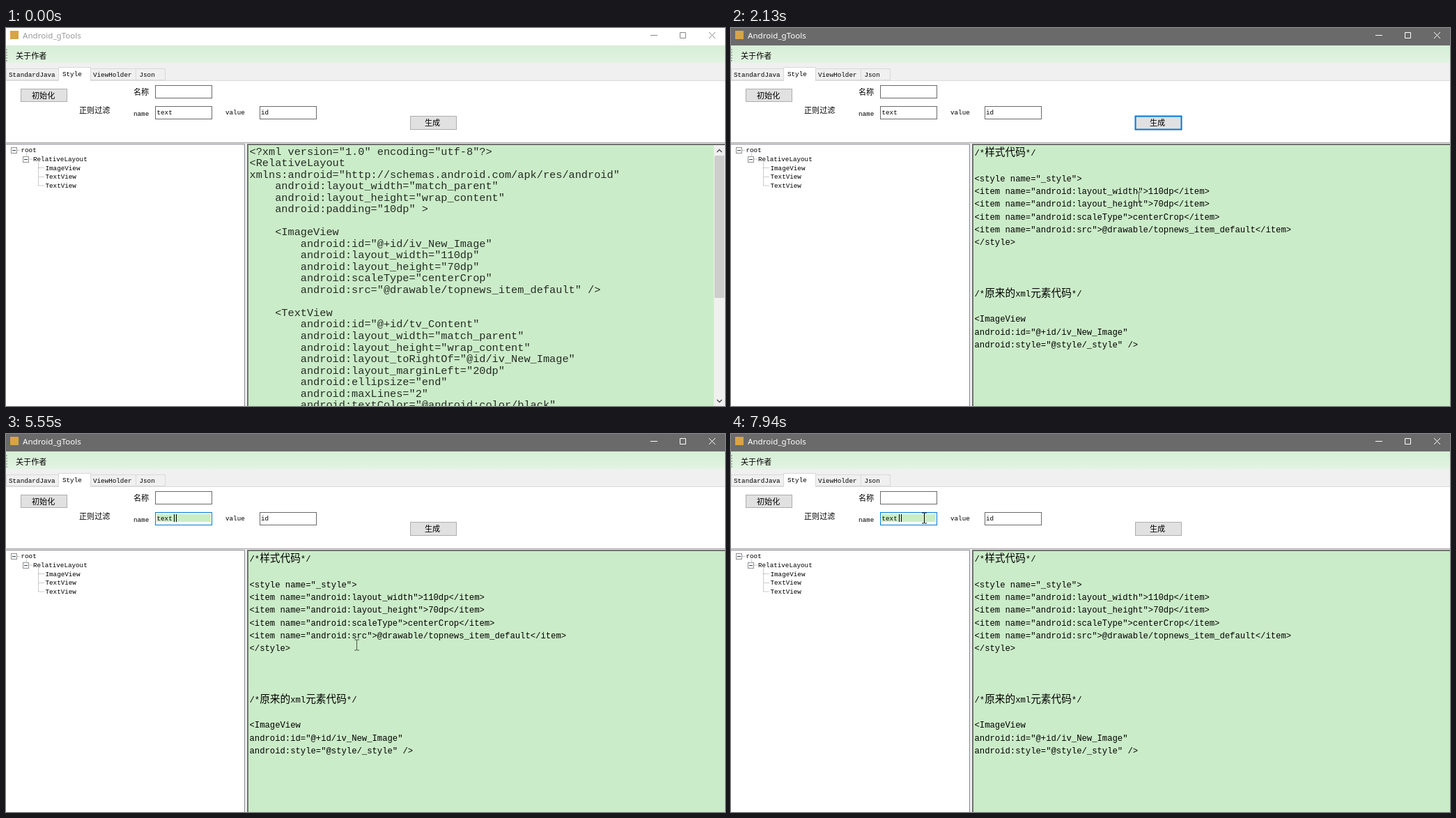
Animation of 1032 by 542 pixels, one loop 8000 ms. Source, as an HTML page:

```html
<!DOCTYPE html>
<html lang="zh">
<head>
<meta charset="utf-8">
<style>
html, body { margin: 0; width: 100%; height: 100%; overflow: hidden; background: #fff; }
svg { display: block; width: 1032px; height: 542px; }
text { white-space: pre; fill: #000; }
.ui { font: 9.25px "Liberation Mono", monospace; }
.ui tspan { font: 11.1px "Noto Sans CJK SC", "Noto Sans CJK", sans-serif; }
.xml { font: 15.27px "Liberation Mono", monospace; fill: #242c24; }
.out { font: 12.22px "Liberation Mono", monospace; }
.out tspan { font: 14.67px "Noto Sans CJK SC", "Noto Sans CJK", sans-serif; }
.title { font: 11.6px "Noto Sans", "Open Sans", sans-serif; }
</style>
</head>
<body>
<svg id="stage" viewBox="0 0 1032 542"></svg>
<script>
const PERIOD = 8000, GREEN = '#cbecc8', BLUE = '#0078d7';

const xmlCode = `<?xml version="1.0" encoding="utf-8"?>
<RelativeLayout
xmlns:android="http://schemas.android.com/apk/res/android"
    android:layout_width="match_parent"
    android:layout_height="wrap_content"
    android:padding="10dp" >

    <ImageView
        android:id="@+id/iv_New_Image"
        android:layout_width="110dp"
        android:layout_height="70dp"
        android:scaleType="centerCrop"
        android:src="@drawable/topnews_item_default" />

    <TextView
        android:id="@+id/tv_Content"
        android:layout_width="match_parent"
        android:layout_height="wrap_content"
        android:layout_toRightOf="@id/iv_New_Image"
        android:layout_marginLeft="20dp"
        android:ellipsize="end"
        android:maxLines="2"
        android:textColor="@android:color/black"`;

const styleCode = `/*样式代码*/

<style name="_style">
<item name="android:layout_width">110dp</item>
<item name="android:layout_height">70dp</item>
<item name="android:scaleType">centerCrop</item>
<item name="android:src">@drawable/topnews_item_default</item>
</style>



/*原来的xml元素代码*/

<ImageView
android:id="@+id/iv_New_Image"
android:style="@style/_style" />`;

const esc = s => s.replace(/&/g, '&amp;').replace(/</g, '&lt;');
const text = (s, x, y, cls = 'ui', id = '') =>
  `<text id="${id}" class="${cls}" x="${x}" y="${y}">` +
  esc(s).replace(/[\u4e00-\u9fff]+/g, '<tspan>$&</tspan>') + '</text>';
const lines = (s, y, pitch, cls) =>
  s.split('\n').map((line, i) => text(line, 349.5, y + i * pitch, cls)).join('');
const rect = (x, y, w, h, fill, stroke = 'none', id = '') =>
  `<rect id="${id}" x="${x}" y="${y}" width="${w}" height="${h}" fill="${fill}" stroke="${stroke}"/>`;
const path = (d, stroke, extra = '') => `<path d="${d}" fill="none" stroke="${stroke}" ${extra}/>`;
const field = (x, y, id) => rect(x + .5, y + .5, 81, 18, '#fff', '#6a6a6a', id);
const tab = (x, w, s, tx) => rect(x + .5, 58.5, w, 16, '#f0f0f0', '#d9d9d9') + text(s, tx, 70);
const toggle = (x, y) => rect(x - 3.5, y - 3.5, 8, 8, '#fff', '#919191') +
  path(`M${x - 2} ${y + .5}h5`, '#345');

const stage = document.getElementById('stage');
stage.innerHTML = `
<defs><linearGradient id="bar" x2="0" y2="1">
  <stop stop-color="#d6eed6"/><stop offset="1" stop-color="#e2f3e2"/>
</linearGradient></defs>
${rect(0, 0, 1032, 542, '#fff')}
${rect(0, 0, 1032, 25, '#fff', 'none', 'titleBar')}
${rect(6, 4, 12, 12, '#d9a441')}
${text('Android_gTools', 24, 15, 'title', 'title')}
<g id="controls" fill="none">
  <path d="M925 10.5h10M967.5 6.5h8v8h-8zM1009 6l9 9m0-9l-9 9"/>
</g>
${rect(0, 25, 1032, 25, 'url(#bar)')}
${path('M1 30v18', '#a9b9a9', 'stroke-width="2" stroke-dasharray="2 2"')}
${text('关于作者', 14, 44)}
${rect(0, 50, 1032, 25, '#f0f0f0')}
${path('M0 75.5H1032', '#dcdcdc')}
${tab(0, 75, 'StandardJava', 4)}${tab(121, 65, 'ViewHolder', 125)}${tab(186, 42, 'Json', 191.5)}
${rect(75.5, 56.5, 46, 19, '#fff', '#d9d9d9')}${rect(76, 75, 45, 2, '#fff')}
${text('Style', 81, 68.5)}
${rect(21.5, 87.5, 66, 18, '#e1e1e1', '#adadad')}${text('初始化', 37, 101)}
${text('正则过滤', 105, 122)}${text('名称', 183, 96)}
${text('name', 183, 125.5)}${text('value', 315, 124)}
${field(214, 82)}${field(214, 112, 'nameField')}${field(364, 112)}
${rect(216, 115, 78, 11, GREEN, 'none', 'tint')}
${text('text', 216.5, 124)}${text('id', 366, 124)}
${path('M241.5 115v11', '#000', 'id="typed"')}
${path('M0 115v11', '#000', 'id="caret"')}
${rect(580.5, 126.5, 66, 19, '#e1e1e1', '#adadad', 'button')}${text('生成', 601, 140)}

${rect(0, 163, 1032, 4, '#f0f0f0')}${path('M0 164.5H1032', '#a8a8a8')}
${path('M0 166.5H342.5V542', '#828790')}
${rect(343, 166, 4, 376, '#f0f0f0')}
${path('M11.5 175.5H20M29.5 180v8H38M46.5 193v33H55M46.5 200.5H55M46.5 213.5H55', '#999', 'stroke-dasharray="1 1"')}
${toggle(11, 175)}${toggle(28, 188)}
${['root', 'RelativeLayout', 'ImageView', 'TextView', 'TextView']
  .map((s, i) => text(s, [21.5, 39, 56.5][Math.min(i, 2)], 178 + i * 12.8)).join('')}

${rect(348, 167, 684, 375, GREEN)}
${path('M1032 167H347V542', '#707070', 'stroke-width="2"')}
<g id="before">
  ${lines(xmlCode, 181.5, 16.53, 'xml')}
  ${rect(1016, 168, 16, 374, '#f0f0f0')}${rect(1017, 183, 14, 204, '#cdcdcd')}
  ${path('M1020.5 178l3.5-3.5 3.5 3.5M1020.5 533l3.5 3.5 3.5-3.5', '#505050', 'stroke-width="1.5"')}
</g>
<g id="after">${lines(styleCode, 183, 18.33, 'out')}</g>
<path id="arrow" d="M0 0V15L3.6 11.6 6 17 8.3 16 6 10.7H10.8Z" fill="#fff" stroke="#000"/>
<path id="beam" d="M-3.5-7.5h3l.5.5.5-.5h3M0-7.5v15M-3.5 7.5h3l.5-.5.5.5h3" fill="none"/>`;

// Pointer stops: time, x, y
const route = [
  [490, 905, 527], [1270, 594, 130], [1600, 594, 130], [1700, 617, 188],
  [1850, 658, 314], [2050, 585, 242], [2220, 585, 242], [2500, 480, 270],
  [2700, 365, 200], [2950, 255, 121], [3060, 255, 121], [3430, 274, 122],
  [3600, 279, 123], [4850, 279, 123], [5050, 283, 92], [5480, 503, 302],
  [5680, 503, 302], [5880, 505, 290], [6700, 505, 290], [7100, 511, 289],
  [7250, 511, 289], [7500, 467, 241], [7850, 277, 120], [PERIOD, 277, 120]
];

// The pointer advances in steps of 77 ms, like a screen recording.
function pointerAt(t) {
  const step = Math.max(490, t - (t - 490) % 77);
  const i = Math.max(1, route.findIndex(p => p[0] > step));
  const [a, b] = [route[i - 1], route[i]];
  const k = (step - a[0]) / (b[0] - a[0]);
  return [a[1] + (b[1] - a[1]) * k, a[2] + (b[2] - a[2]) * k];
}

const $ = id => document.getElementById(id);
const within = (t, a, b) => t >= a && t < b;
const show = (id, on) => $(id).style.display = on ? '' : 'none';
const set = (id, attrs) => { for (const k in attrs) $(id).setAttribute(k, attrs[k]); };

function draw(t) {
  const active = t >= 490, done = t >= 1600, focused = t >= 3060, typed = t >= 4470;
  set('titleBar', { fill: active ? '#6a6a6a' : '#fff' });
  $('title').style.fill = active ? '#fff' : '#999';
  set('controls', { stroke: active ? '#fff' : '#888' });

  const pressed = within(t, 1350, 1600), focusRing = within(t, 1600, 3060);
  set('button', {
    fill: pressed ? '#cce4f7' : '#e1e1e1',
    stroke: pressed ? '#005499' : focusRing ? BLUE : '#adadad',
    'stroke-width': focusRing ? 2 : 1
  });
  show('before', !done);
  show('after', done);

  set('nameField', { stroke: focused ? BLUE : '#6a6a6a' });
  show('tint', focused && !within(t, 6390, 7250));
  show('typed', typed);
  set('caret', { transform: `translate(${typed ? 244.5 : 238.5})` });
  show('caret', focused && !within(t, 3830, 4470) && !within(t, 6160, 6690) && !within(t, 7220, 7750));

  const [x, y] = pointerAt(t);
  const onCode = x > 348 && y > 167;
  const onField = x > 213 && x < 296 && (within(y, 81, 101) || within(y, 111, 131));
  const visible = active && !within(t, 4470, 4850);
  show('arrow', visible && !onCode && !onField);
  show('beam', visible && (onCode || onField));
  set('arrow', { transform: `translate(${x} ${y})` });
  set('beam', {
    transform: `translate(${Math.floor(x) + .5} ${Math.floor(y) + .5})`,
    stroke: onCode ? '#4a544a' : '#000'
  });
}

const start = performance.now();
(function loop() {
  draw((performance.now() - start) % PERIOD);
  requestAnimationFrame(loop);
})();
</script>
</body>
</html>
```
